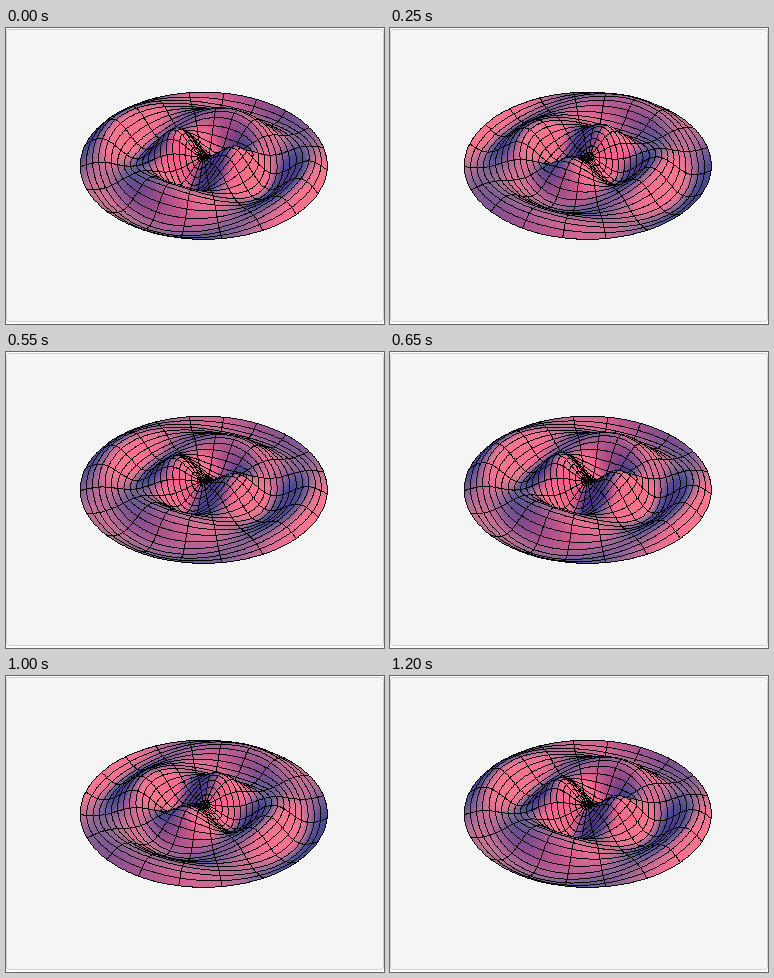
An HTML page with a canvas for the animation above (1.25 s loop, 378 by 296 pixels).

```html
<!DOCTYPE html>
<html lang="en">
<head>
<meta charset="utf-8">
<title>Vibrating drum membrane</title>
<style>
  html, body { margin: 0; width: 100%; height: 100%; overflow: hidden; background: #fff; }
  canvas { display: block; }
</style>
</head>
<body>
<canvas id="stage" width="378" height="296"></canvas>
<script>
const WIDTH = 378, HEIGHT = 296;
const ctx = document.getElementById('stage').getContext('2d', { willReadFrequently: true });

const STEP_MS = 50, STEPS = 25, CYCLES = 2, PHASE = 0.035;
const AMPLITUDE = 0.365, BESSEL_ZERO = 11.6198;

// The surface is finer than the mesh lines drawn on it.
const MESH = 20, RING_DETAIL = 3, SECTOR_DETAIL = 6;
const RINGS = MESH * RING_DETAIL, SECTORS = MESH * SECTOR_DETAIL;
const LINE_BIAS = 0.03;

// Camera direction (1.3, -2.4, 2), distance in units of the drum radius.
const AZIMUTH = Math.atan2(2.4, 1.3);
const ELEVATION = Math.atan2(2, Math.hypot(1.3, 2.4));
const SIN = Math.sin(ELEVATION), COS = Math.cos(ELEVATION);
const DISTANCE = 2 * Math.hypot(1.3, 2.4, 2);
const ZOOM = 830, CX = 197.75, CY = 129;

// Lights in view space (right, up, towards the viewer), one per colour channel.
const LIGHTS = [
  { dir: [1, 0, 1], ambient: 76, power: 210 },
  { dir: [1, 1, 1], ambient: 48, power: 70 },
  { dir: [0, 1, 1], ambient: 102, power: 48 }
];

function bessel2(x) {
  const n = 32;
  let sum = 0;
  for (let i = 0; i < n; i++) {
    const a = (i + 0.5) * Math.PI / n;
    sum += Math.cos(2 * a - x * Math.sin(a));
  }
  return sum / n;
}

const radialShape = Array.from({ length: RINGS + 1 },
  (_, i) => AMPLITUDE * bessel2(BESSEL_ZERO * i / RINGS));

function vertex(ring, sector, swing) {
  const r = ring / RINGS;
  const theta = 2 * Math.PI * sector / SECTORS;
  const side = r * Math.sin(theta + AZIMUTH);
  const front = r * Math.cos(theta + AZIMUTH);
  const height = swing * radialShape[ring] * Math.cos(2 * theta);
  const view = [side, height * COS - front * SIN, front * COS + height * SIN];
  const depth = DISTANCE - view[2];
  const scale = ZOOM / depth;
  return { view, depth, x: CX + view[0] * scale, y: CY - view[1] * scale };
}

const subtract = (a, b) => [a[0] - b[0], a[1] - b[1], a[2] - b[2]];
const dot = (a, b) => a[0] * b[0] + a[1] * b[1] + a[2] * b[2];
const cross = (a, b) => [
  a[1] * b[2] - a[2] * b[1],
  a[2] * b[0] - a[0] * b[2],
  a[0] * b[1] - a[1] * b[0]
];

function shade(a, b, c, d) {
  const n = cross(subtract(c.view, a.view), subtract(d.view, b.view));
  // The lit side is the top of the membrane.
  const sign = n[1] * COS + n[2] * SIN < 0 ? -1 : 1;
  const length = Math.hypot(...n) * sign;
  return LIGHTS.map(({ dir, ambient, power }) =>
    ambient + power * Math.max(0, dot(n, dir) / (length * Math.hypot(...dir))));
}

function drawPanel() {
  ctx.fillStyle = '#fff';
  ctx.fillRect(0, 0, WIDTH, HEIGHT);
  ctx.beginPath();
  ctx.roundRect(0.5, 1.5, 377, 292, 3);
  ctx.fillStyle = '#f5f5f5';
  ctx.fill();
  ctx.strokeStyle = '#d0d0d0';
  ctx.stroke();
}

drawPanel();
const panel = ctx.getImageData(0, 0, WIDTH, HEIGHT);
const image = ctx.createImageData(WIDTH, HEIGHT);
const depths = new Float32Array(WIDTH * HEIGHT);

function plot(x, y, depth, color, bias = 0) {
  const i = y * WIDTH + x;
  if (depth - bias > depths[i]) return;
  depths[i] = Math.min(depth, depths[i]);
  image.data.set(color, i * 4);
}

function fillTriangle(a, b, c, color) {
  const area = (b.x - a.x) * (c.y - a.y) - (c.x - a.x) * (b.y - a.y);
  if (!area) return;
  const left = Math.floor(Math.min(a.x, b.x, c.x)), right = Math.max(a.x, b.x, c.x);
  const top = Math.floor(Math.min(a.y, b.y, c.y)), bottom = Math.max(a.y, b.y, c.y);
  for (let y = top; y <= bottom; y++) {
    for (let x = left; x <= right; x++) {
      const dx = x + 0.5 - a.x, dy = y + 0.5 - a.y;
      const u = (dx * (c.y - a.y) - dy * (c.x - a.x)) / area;
      const v = (dy * (b.x - a.x) - dx * (b.y - a.y)) / area;
      if (u < 0 || v < 0 || u + v > 1) continue;
      plot(x, y, a.depth + u * (b.depth - a.depth) + v * (c.depth - a.depth), color);
    }
  }
}

function drawLine(a, b) {
  const steps = Math.max(1, Math.ceil(Math.max(Math.abs(b.x - a.x), Math.abs(b.y - a.y))));
  for (let i = 0; i <= steps; i++) {
    const t = i / steps;
    plot(Math.floor(a.x + t * (b.x - a.x)), Math.floor(a.y + t * (b.y - a.y)),
      a.depth + t * (b.depth - a.depth), [0, 0, 0], LINE_BIAS);
  }
}

function drawMembrane(swing) {
  image.data.set(panel.data);
  depths.fill(Infinity);
  const grid = Array.from({ length: RINGS + 1 }, (_, i) =>
    Array.from({ length: SECTORS + 1 }, (_, j) => vertex(i, j, swing)));

  for (let i = 0; i < RINGS; i++) {
    for (let j = 0; j < SECTORS; j++) {
      const a = grid[i][j], b = grid[i + 1][j], c = grid[i + 1][j + 1], d = grid[i][j + 1];
      const color = shade(a, b, c, d);
      fillTriangle(a, b, c, color);
      fillTriangle(a, c, d, color);
    }
  }
  for (let i = 0; i <= RINGS; i++) {
    for (let j = 0; j < SECTORS; j++) {
      if (i % RING_DETAIL === 0) drawLine(grid[i][j], grid[i][j + 1]);
      if (i < RINGS && j % SECTOR_DETAIL === 0) drawLine(grid[i][j], grid[i + 1][j]);
    }
  }
  ctx.putImageData(image, 0, 0);
}

let shownStep = -1;

function render(now) {
  const step = Math.floor(now / STEP_MS) % STEPS;
  if (step === shownStep) return;
  shownStep = step;
  drawMembrane(Math.cos(2 * Math.PI * CYCLES * step / STEPS + PHASE));
}

const start = performance.now();

function tick() {
  render(performance.now() - start);
  requestAnimationFrame(tick);
}

tick();
</script>
</body>
</html>
```
